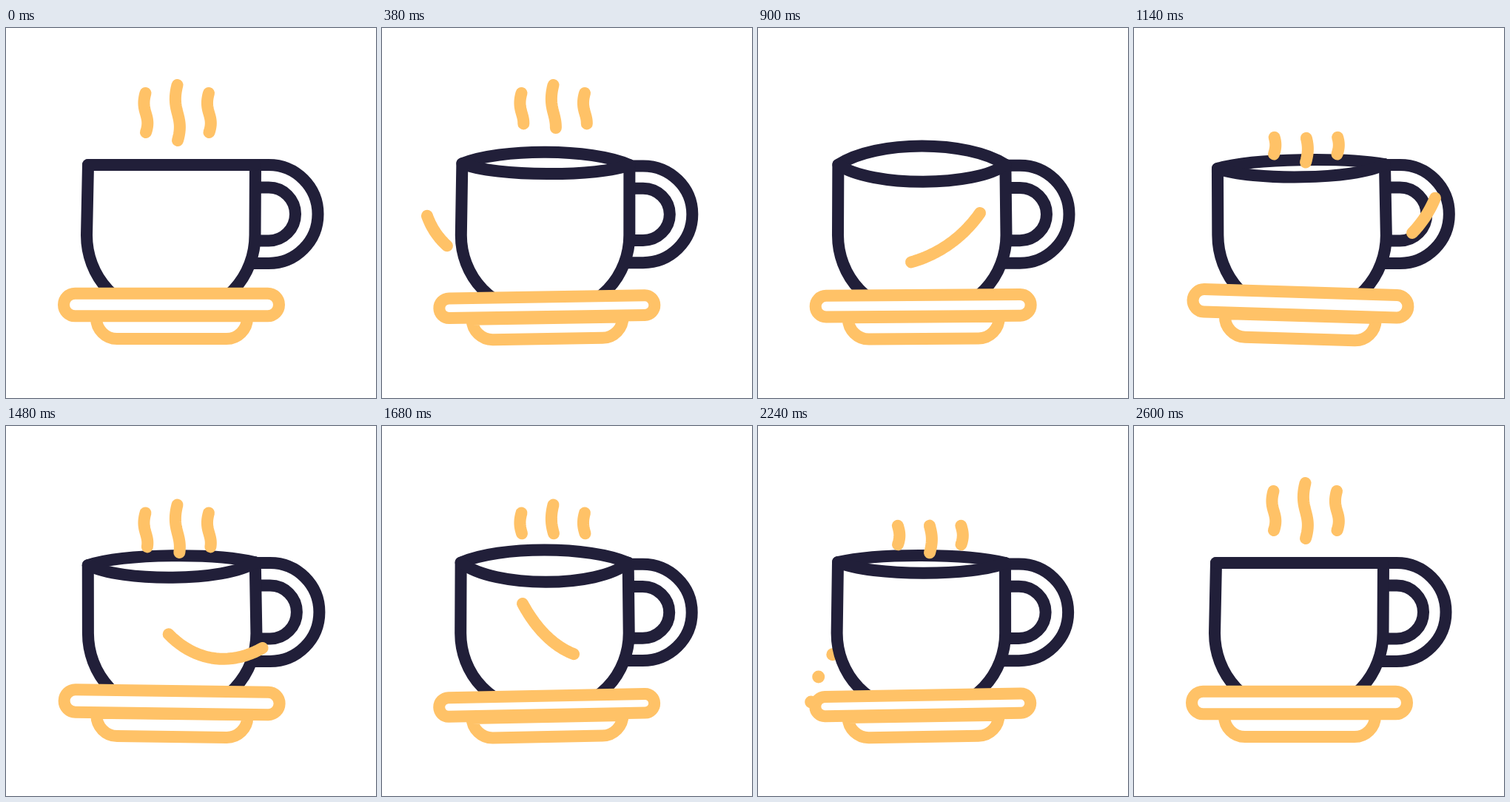
Write an HTML page with a canvas that moves like this. It is 500x500 px and loops after 2.66 s.

```html
<!DOCTYPE html>
<html lang="en">
<head>
<meta charset="utf-8">
<style>
  html, body { margin: 0; height: 100%; overflow: hidden; background: #fff; }
  canvas { display: block; }
</style>
</head>
<body>
<canvas id="stage" width="500" height="500"></canvas>
<script>
const ctx = document.getElementById('stage').getContext('2d');
const LOOP = 2660, INK = '#211f39', GOLD = '#ffc267';
const KEY_TIMES = [160, 640, 1240, 1880, 2580];

const steam = [
  [188.5, 88, 181, 114, 197, 118, 189, 141],
  [231.5, 77, 222, 114, 242, 118, 232, 152],
  [274, 88, 266.5, 114, 282.5, 118, 274.5, 141]
];
const leftSplash = [57, 240, 80, 345, 230, 350, 300, 250];
const rightSplash = [412, 215, 385, 310, 260, 370, 190, 240];
const drops = [[-49, -41], [-68, -11], [-78, 23]];

const unit = (t, from, to) => Math.min(1, Math.max(0, (t - from) / (to - from)));
const ease = (t, from, to) => (1 - Math.cos(Math.PI * unit(t, from, to))) / 2;

// Eased value between the shared wobble poses.
function pose(t, ...values) {
  return KEY_TIMES.slice(1).reduce((sum, time, i) =>
    sum + (values[i + 1] - values[i]) * ease(t, KEY_TIMES[i], time), values[0]);
}

function bezier([x0, y0, x1, y1, x2, y2, x3, y3], u) {
  const v = 1 - u, a = v * v * v, b = 3 * v * v * u, c = 3 * v * u * u, d = u * u * u;
  return [a * x0 + b * x1 + c * x2 + d * x3, a * y0 + b * y1 + c * y2 + d * y3];
}

function paint(color, build, filled) {
  ctx.beginPath();
  build();
  if (filled) { ctx.fillStyle = '#fff'; ctx.fill(); }
  ctx.strokeStyle = color;
  ctx.stroke();
}

function trimmed(curve, from, to, dy = 0) {
  if (to - from < 0.01) return;
  paint(GOLD, () => {
    for (let i = 0; i <= 24; i++) {
      const [x, y] = bezier(curve, from + (to - from) * i / 24);
      ctx.lineTo(x, y + dy);
    }
  });
}

function drawDrops(t) {
  const u = unit(t, 2040, 2560);
  if (u === 0 || u === 1) return;
  const spread = 1.61 * (1 - (1 - u) ** 2);
  const radius = 8.5 * (1 - unit(t, 2400, 2560));
  ctx.fillStyle = GOLD;
  for (const [dx, dy] of drops) {
    ctx.beginPath();
    ctx.arc(150 + dx * spread, 350 + dy * spread, radius, 0, 2 * Math.PI);
    ctx.fill();
  }
}

function drawCup(t, sway, squash) {
  const shift = pose(t, 0, -6, 2.5, -6.3, 0), low = 5 * sway;
  const left = 111 + shift, leftY = 185 + pose(t, 0, -4, 5.5, -2, 0);
  const right = 337 + shift, rightY = 185 - pose(t, 0, 0, 1, 0, 0);
  const back = 185 + 4 / 3 * pose(t, 0, -39, -5, -21, 0);
  const front = 185 + 4 / 3 * pose(t, 0, 28, 15, 29, 0);
  const along = part => left + part * (right - left);
  const handleY = 251.5 + squash * 0.7;

  for (const r of [66.5, 36]) {
    const ry = r - (r > 50 ? 2.5 : 2) * squash;
    paint(INK, () => {
      ctx.moveTo(335 + low, handleY - ry);
      ctx.ellipse(355 + low, handleY, r, ry, 0, -Math.PI / 2, Math.PI / 2);
      ctx.lineTo(335 + low, handleY + ry);
    });
  }
  paint(INK, () => {
    const ry = 105 - 3 * squash;
    ctx.moveTo(left, leftY);
    ctx.bezierCurveTo(along(0.23), back, along(0.77), back, right, rightY);
    ctx.lineTo(336.5 + low, 280);
    ctx.ellipse(236.5 + low, 280, 100, ry, 0, 0, Math.PI / 2);
    ctx.ellipse(209 + low, 280, 100, ry, 0, Math.PI / 2, Math.PI);
    ctx.closePath();
  }, true);
  paint(INK, () => {
    ctx.moveTo(left, leftY);
    ctx.bezierCurveTo(along(0.2), front, along(0.82), front, right, rightY);
  });
}

function drawSaucer(sway, squash) {
  const height = 30.5 - 9 * squash;
  const middle = 374 + (sway < 0 ? -6 : -2) * sway;
  ctx.save();
  ctx.translate(224, 420);
  ctx.rotate(2 * sway * Math.PI / 180);
  ctx.translate(-224, -420);
  paint(GOLD, () => {
    const top = 389 + 7 * squash;
    ctx.moveTo(122, top);
    ctx.arc(150, 392, 28, Math.PI, Math.PI / 2, true);
    ctx.arc(298, 392, 28, Math.PI / 2, 0, true);
    ctx.lineTo(326, top);
    ctx.closePath();
  }, true);
  paint(GOLD, () => {
    const r = height / 2;
    ctx.arc(78 + r, middle, r, Math.PI / 2, Math.PI * 1.5);
    ctx.arc(369 - r, middle, r, -Math.PI / 2, Math.PI / 2);
    ctx.closePath();
  }, true);
  ctx.restore();
}

function drawSteam(t) {
  let from = 0, to = 1, dy = 0;
  if (t < 920) {
    to = 1 - ease(t, 160, 920);
  } else if (t < 2040) {
    from = 1 - ease(t, 920, 1400);
    to = 1 - ease(t, 1325, 2040);
    dy = 29.5;
  } else {
    from = 1 - ease(t, 2040, 2440);
    dy = 29.5 * (1 - ease(t, 2000, 2600));
  }
  for (const curve of steam) trimmed(curve, from, to, dy);
}

function draw(t) {
  const sway = pose(t, 0, -1, 1, -1, 0);
  const squash = Math.max(0, -sway);
  ctx.clearRect(0, 0, 500, 500);
  ctx.lineWidth = 16;
  ctx.lineCap = ctx.lineJoin = 'round';
  drawDrops(t);
  drawCup(t, sway, squash);
  drawSaucer(sway, squash);
  drawSteam(t);
  trimmed(leftSplash, unit(t, 193, 1069) ** 2, ease(t, 160, 875));
  trimmed(rightSplash, unit(t, 940, 1815) ** 2, ease(t, 880, 1665));
}

function tick() {
  draw(performance.now() % LOOP);
  requestAnimationFrame(tick);
}
tick();
</script>
</body>
</html>
```
